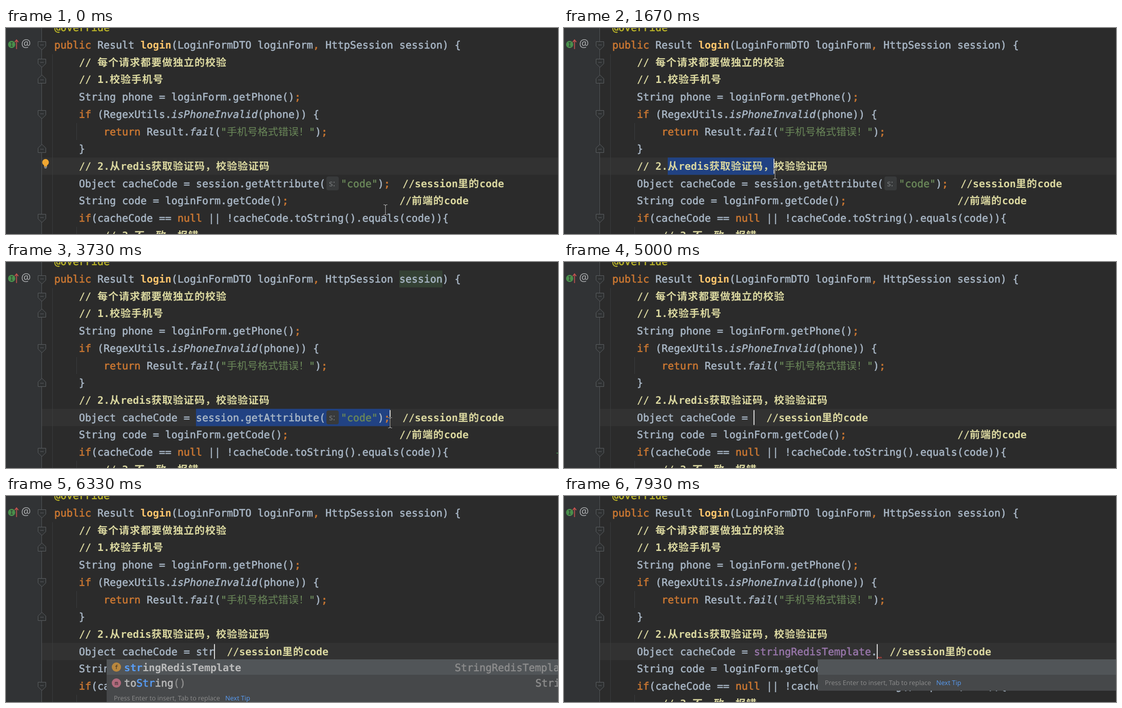
An HTML page that plays this animation: 1075 px wide and 401 px high, repeating every 8 s.

```html
<!DOCTYPE html>
<html lang="zh">
<head>
<meta charset="utf-8">
<title>Code editor</title>
<style>
html, body { margin: 0; width: 100%; height: 100%; overflow: hidden; background: #2b2b2b; }
svg { display: block; }
text {
  white-space: pre; color: #a9b7c6; fill: currentColor; stroke: currentColor; stroke-width: .55px;
  font: 19.93px "DejaVu Sans Mono", monospace; text-rendering: geometricPrecision;
}
text.cjk { font: 300 20px "Noto Sans CJK SC", "Noto Sans CJK", sans-serif; stroke: none; }
text.key { color: #cc7832; }
text.decl { color: #ffc66d; font-weight: 700; stroke: none; }
text.note { color: #dbd8a0; font-weight: 700; stroke: none; }
text.note.cjk { font-weight: 700; letter-spacing: 1px; }
text.str { color: #6a8759; }
text.meta { color: #bbb529; }
text.call { font-style: italic; }
text.field { color: #9876aa; }
text.bad { color: #bc3f3c; }
text.hit { color: #589df6; }
text.item { color: #bbbbbb; }
text.strong { font-weight: 700; stroke: none; }
text.dim { color: #8c8c8c; }
text.ui { font: 12.6px "Open Sans", "Noto Sans", sans-serif; stroke: none; }
text.tag { font: 16px "Open Sans", "Noto Sans", sans-serif; color: #7e8183; stroke: none; }
text.at { font: 21px "Open Sans", "Noto Sans", sans-serif; color: #afb1b3; text-anchor: middle; stroke: none; }
text.badge { font: 11px "DejaVu Sans Mono", monospace; text-anchor: middle; color: #2b2b2b; stroke: none; }
.guide { fill: #393b3c; }
.fold { fill: #2e3031; stroke: #5a5d60; }
.wave { fill: none; stroke: #bc3f3c; stroke-width: 1.2; }
</style>
</head>
<body>
<svg width="1075" height="401" viewBox="0 0 1075 401">
  <rect width="1075" height="401" fill="#2b2b2b"/>
  <rect width="69" height="401" fill="#313335"/>
  <rect id="band" x="70" width="1005" height="33.7" fill="#323232"/>
  <g id="marks"></g>
  <rect id="sel" height="33.7" fill="#214283"/>
  <g id="still"></g>
  <g id="live"></g>
  <rect id="caret" width="2" height="29" fill="#d0d0d0"/>
  <g id="popup"></g>
  <g id="mouse" fill="none">
    <path d="M-4 -10H-1.5L0 -8.5L1.5 -10H4M0 -8.5V8.5M-4 10H-1.5L0 8.5L1.5 10H4" stroke="#111" stroke-width="2.6"/>
    <path d="M-4 -10H-1.5L0 -8.5L1.5 -10H4M0 -8.5V8.5M-4 10H-1.5L0 8.5L1.5 10H4" stroke="#c8c8c8" stroke-width="1.1"/>
  </g>
</svg>
<script>
const LOOP = 8000, FRAME = 1000 / 15, CHAR = 12, STEP = 33.7;
const FIELD = 'stringRedisTemplate';
const $ = id => document.getElementById(id);
const rowY = i => 33 + STEP * i;
const rect = (x, y, w, h, fill, rx = 0) =>
  `<rect x="${x}" y="${y}" width="${w}" height="${h}" fill="${fill}" rx="${rx}"/>`;
const text = (x, y, cls, s) => `<text x="${x}" y="${y}" class="${cls}">${s}</text>`;
const wave = (x, y, n) => `<path class="wave" d="M${x} ${y}${'l2 -2.5l2 2.5'.repeat(n)}"/>`;

// Lays out alternating class / string arguments from x on one baseline.
function run(x, y, ...parts) {
  let out = '';
  for (let i = 0; i < parts.length; i += 2) {
    const cls = parts[i];
    for (const s of parts[i + 1].match(/[\x00-\x7f]+|[^\x00-\x7f]+/g) || []) {
      const wide = s.charCodeAt(0) > 127;
      out += text(x, y, wide ? cls + ' cjk' : cls, s);
      x += s.length * (!wide ? CHAR : cls === 'note' ? 21 : 20);
    }
  }
  return out;
}
const line = (row, x, ...parts) => run(x, Math.round(rowY(row) + 7), ...parts);

function fold(y, dir) {
  const d = `M62.5 ${y - 8 * dir}h15v${9 * dir}l-7.5 ${7 * dir}l-7.5 ${-7 * dir}z`;
  return `<path class="fold" d="${d}M66.5 ${y - dir * 1.5}h7"/>`;
}

function stillParts() {
  return rect(69, 0, 1, 401, '#505355') +
    '<g class="guide"><path d="M90 51h1V401h-1zM137 185h1V218h-1zM137 387h1V401h-1z"/></g>' +
    [[34.5, 1], [68.5, 1], [99.5, -1], [168.5, 1], [234.5, -1], [370.5, 1]].map(f => fold(...f)).join('') +
    '<circle cx="11" cy="32" r="7" fill="#4a8f4c"/>' + text(11, 36, 'badge', 'I') +
    '<path d="M20.5 41V24M17 27.5L20.5 23L24 27.5" fill="none" stroke="#c75450" stroke-width="1.6"/>' +
    text(39, 37, 'at', '@') +
    line(-1, 94, 'meta', '@Override') +
    line(0, 94, 'key', 'public ', '', 'Result ', 'decl', 'login', '', '(LoginFormDTO loginForm',
      'key', ', ', '', 'HttpSession session) {') +
    line(1, 142, 'note', '// 每个请求都要做独立的校验') +
    line(2, 142, 'note', '// 1.校验手机号') +
    line(3, 142, '', 'String phone = loginForm.getPhone()', 'key', ';') +
    line(4, 142, 'key', 'if ', '', '(RegexUtils.', 'call', 'isPhoneInvalid', '', '(phone)) {') +
    line(5, 190, 'key', 'return ', '', 'Result.', 'call', 'fail', '', '(',
      'str', '"手机号格式错误！"', '', ')', 'key', ';') +
    line(6, 142, '', '}') +
    line(7, 142, 'note', '// 2.从redis获取验证码，校验验证码') +
    line(8, 142, '', 'Object cacheCode = ') +
    line(11, 190, 'note', '// 3.不一致，报错');
}

const BULB = '<circle cx="77" cy="261.5" r="6.5" fill="#f0a732"/>' +
  rect(74, 267, 6, 2.5, '#f0a732') + rect(74, 270, 6, 1.2, '#b0b0b0') + rect(75, 272, 4, 1.2, '#b0b0b0');

// Text after the assignment, by time.
const TYPED = [[4800, ''], [5730, 's'], [5930, 'st'], [6130, 'str'], [6400, 'stri'],
  [6600, 'strin'], [6870, 'string'], [7200, FIELD], [7800, FIELD + '.']];
const typedAt = t => TYPED.filter(k => k[0] <= t).pop()[1];

// Mouse keys: time, x, y.
const PATH = [[0, 739, 354], [870, 223, 284], [930, 219, 281], [1000, 219, 281], [1130, 214, 275],
  [1200, 214, 275], [1530, 423, 286], [1670, 411, 284], [2200, 411, 284], [2400, 422, 287],
  [2870, 378, 313], [3070, 377, 313], [3130, 388, 313], [3730, 748, 313], [4130, 748, 313], [4200, 749, 314]];
function mouseAt(t) {
  const n = PATH.findIndex(k => k[0] > t);
  if (n < 0) return PATH[PATH.length - 1].slice(1);
  const [a, b] = [PATH[n - 1], PATH[n]];
  let p = (t - a[0]) / (b[0] - a[0]);
  p = p * p * (3 - 2 * p);
  return [1, 2].map(i => a[i] + (b[i] - a[i]) * p);
}

// Caret stops on the two rows where text gets selected.
const span = (from, step, n) => Array.from({ length: n }, (_, i) => from + step * i);
const STOPS = { 7: [202, ...span(223, 12, 5), ...span(283, 21, 7)], 8: [...span(370, 12, 22), ...span(652, 12, 9)] };
const snap = (row, x) => STOPS[row].reduce((a, b) => Math.abs(b - x) < Math.abs(a - x) ? b : a);

function liveParts(t) {
  const bad = t >= 5800 && t < 7530 ? 'bad' : '';
  let out = t < 1270 ? BULB : '';
  if (t < 4800) {
    out += line(8, 370, '', 'session.getAttribute(') + rect(624, 289, 24, 27, '#383a3b', 4) +
      text(629, 308, 'tag', 's:') +
      line(8, 652, 'str', '"code"', '', ')', 'key', ';', '', '  ', 'note', '//session里的code');
  } else {
    const s = typedAt(t), dot = s.endsWith('.');
    out += line(8, 370, t >= 7530 ? 'field' : '', s.replace('.', ''), '', dot ? '.' : '',
      '', '  ', 'note', '//session里的code');
    if (dot) out += wave(611, 316, 2);
  }
  if (bad) out += wave(214, 349, 3);
  return out +
    line(9, 142, '', 'String ', bad, 'code', '', ' = loginForm.getCode()', 'key', ';',
      '', ' '.repeat(18), 'note', '//前端的code') +
    line(10, 142, 'key', 'if', '', '(cacheCode == ', 'key', 'null', '',
      ' || !cacheCode.toString().equals(', bad, 'code', '', ')){');
}

function markParts(t) {
  const green = '#344134', tick = '#3c7a45';
  if (t >= 3130 && t < 4930)
    return rect(766, 16.5, 84, 33, green) + rect(1072, 371, 3, 2, tick) +
      (t < 4800 ? rect(370, 286, 84, 33.5, green) : '');
  if (t >= 7200 && t < 7800)
    return rect(370, 286, 228, 33.5, green) + rect(1072, 211, 3, 2, tick);
  return '';
}

const tip = (x, y) => text(x, y, 'ui dim', 'Press Enter to insert, Tab to replace') +
  text(x + 217, y, 'ui hit', 'Next Tip');
const badge = (y, fill, s) => `<circle cx="215" cy="${y}" r="9" fill="${fill}"/>` + text(215, y + 4, 'badge', s);
const panel = (x, h) => rect(x, 318, 1075 - x, h, '#46484a') + rect(x, 318, 1075 - x, 30, '#515558');

function popupParts(t) {
  if (t >= 7930) return panel(494, 61) + tip(508, 368);
  if (t < 6200 || t >= 7200) return '';
  const s = typedAt(t), n = s.length;
  return panel(196, 83) +
    badge(333, '#b9873d', 'f') + badge(364, '#b06a7c', 'm') +
    run(230, 341, 'hit strong', s, 'item strong', FIELD.slice(n)) +
    run(874, 341, 'dim', 'StringRedisTemplate') +
    run(230, 371, 'item', 'to', 'hit', 'S' + s.slice(1), 'item', 'String'.slice(n), 'dim', '()') +
    run(1031, 371, 'dim', 'String') +
    tip(210, 398);
}

const cache = {};
function fill(id, html) {
  if (cache[id] !== html) $(id).innerHTML = cache[id] = html;
}
function put(id, attrs) {
  for (const k in attrs) $(id).setAttribute(k, attrs[k]);
}
const show = (id, on) => put(id, { visibility: on ? 'visible' : 'hidden' });

function draw(now) {
  const t = Math.round(Math.floor((now + 4) / FRAME) * FRAME / 10) * 10;
  const [mx, my] = mouseAt(t);
  const row = t < 2930 ? 7 : 8;
  const top = rowY(row) - 16.8;
  const start = row === 7 ? 202 : 370;
  let end = start;
  if (t >= 1270 && t < 2930) end = snap(7, t < 1670 ? Math.min(mx, 409) : 409);
  else if (t >= 3130 && t < 4800) end = snap(8, mx);

  put('band', { y: top });
  put('sel', { x: start, y: top, width: t < 4800 ? end - start : 0 });
  put('caret', { x: (t < 4800 ? end : 370 + CHAR * typedAt(t).length) - 1, y: top + 2.5 });
  show('caret', t >= 1270 && (t < 4200 || t >= 4800));
  put('mouse', { transform: `translate(${mx.toFixed(1)} ${my.toFixed(1)})` });
  show('mouse', t < 4800);
  fill('marks', markParts(t));
  fill('live', liveParts(t));
  fill('popup', popupParts(t));
}

$('still').innerHTML = stillParts();
const begin = performance.now();
function tick() {
  draw((performance.now() - begin) % LOOP);
  requestAnimationFrame(tick);
}
tick();
</script>
</body>
</html>
```
